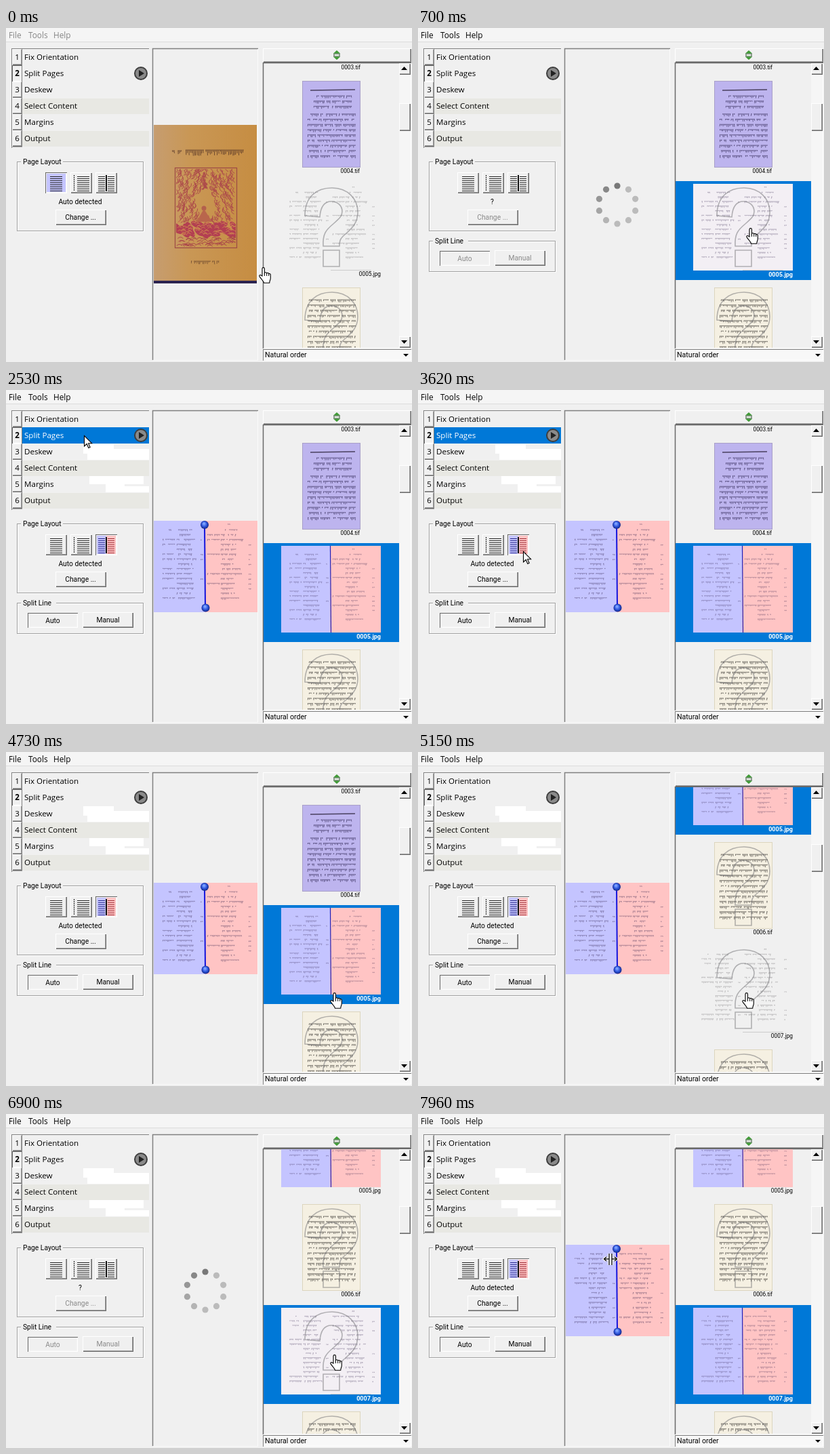
An HTML page with a canvas that plays this animation: 599x493 px, repeating every 8 s.

```html
<!DOCTYPE html>
<html lang="en">
<head>
<meta charset="utf-8">
<title>Splitting scanned pages</title>
<style>
html, body { margin: 0; width: 100%; height: 100%; overflow: hidden; background: #f0f0f0; }
canvas { display: block; }
</style>
</head>
<body>
<canvas id="stage" width="599" height="493"></canvas>
<script>
const c = document.getElementById('stage').getContext('2d');
const LOOP = 8000, BLUE = '#0078d7', LILAC = '#c4c4ff', PINK = '#ffc4c4';
const UI = '"Open Sans", "Noto Sans", sans-serif';
const SMALL = 'Roboto, "Open Sans", sans-serif';

// Pointer stops: time, left, top, shape
const pointer = [
  [0, 373, 353, 'hand'], [140, 410, 334, 'hand'], [280, 447, 314, 'hand'], [420, 484, 295, 'hand'],
  [1400, 335, 216, 'arrow'], [1540, 197, 143, 'arrow'], [1700, 175, 128, 'arrow'],
  [1850, 147, 110, 'arrow'], [1990, 123, 86, 'arrow'], [2130, 115, 67, 'arrow'],
  [3070, 118, 84, 'arrow'], [3200, 128, 126, 'arrow'], [3340, 140, 176, 'arrow'],
  [3480, 151, 220, 'arrow'], [3620, 155, 238, 'arrow'], [3780, 255, 252, 'arrow'],
  [3910, 400, 272, 'hand'], [4050, 496, 285, 'hand'], [4170, 495, 285, 'hand'],
  [4730, 478, 355, 'hand'], [7160, 455, 348, 'hand'], [7300, 421, 336, 'hand'],
  [7420, 372, 304, 'arrow'], [7560, 330, 262, 'split'], [7690, 303, 234, 'split'],
  [7830, 290, 220, 'split'], [7960, 284, 214, 'split']
];
const handShape = new Path2D('M5 13V2.3a1.7 1.7 0 0 1 3.4 0V8.5c.5-1 3-1 3.3.4.8-.8 2.8-.5 3 .8 1-.6 2.6 0 2.6 1.6V16c0 3-1.6 4-1.6 7.3H7.5C7 20.5 3 17 1 13.6c-.8-1.6 1.2-2.8 2.6-1.4z');
const arrowShape = new Path2D('M.5.5V16l3.7-3.5 2.6 6 2.3-1-2.5-5.8h5z');
const markShape = new Path2D('M-39 41C-39 13-22 0 1 0C25 0 39 17 39 36C39 52 30 60 21 68C14 74 12 76 12 86H-12C-13 68-8 62 3 53C11 46 16 42 16 35C16 26 9 20 0 20C-10 20-16 28-17 43ZM-12 92h24v24h-24z');

let seed = 1;
const rnd = () => (seed = seed * 16807 % 2147483647) / 2147483647;

function box(x, y, w, h, color) {
  c.fillStyle = color;
  c.fillRect(x, y, w, h);
}
function text(s, x, y, size, color = '#000', font = UI, align = 'left', weight = 400) {
  c.font = `${weight} ${size}px ${font}`;
  c.textAlign = align;
  c.textBaseline = 'middle';
  c.fillStyle = color;
  c.fillText(s, x, y);
}
function line(color, width, ...p) {
  c.strokeStyle = color;
  c.lineWidth = width;
  c.beginPath();
  for (let i = 0; i < p.length; i += 2) c.lineTo(p[i], p[i + 1]);
  c.stroke();
}
function disc(x, y, r, color) {
  c.fillStyle = color;
  c.beginPath();
  c.arc(x, y, r, 0, 7);
  c.fill();
}
function bevel(x, y, w, h, sunken) {
  box(x, y, w, h, sunken ? '#696969' : '#fff');
  box(x + 1, y + 1, w - 1, h - 1, sunken ? '#fff' : '#696969');
  box(x + 1, y + 1, w - 2, h - 2, sunken ? '#f4f4f4' : '#a0a0a0');
  box(x + 1, y + 1, w - 3, h - 3, '#f0f0f0');
}

// Adds a run of script-like strokes hanging from a head line
function scribble(x, y, w, h) {
  for (let i = x; i < x + w; i += 2.1) {
    if (rnd() < .12) continue;
    c.moveTo(i, y);
    c.lineTo(i + 1.5, y);
    c.moveTo(i + .6, y);
    c.lineTo(i + rnd() * 1.4, y + h * (.2 + .8 * rnd()));
  }
}
function ink(color, width, build) {
  c.strokeStyle = color;
  c.lineWidth = width;
  c.beginPath();
  build();
  c.stroke();
}

function spread(x, y, w, h, start, tinted, paper, inkColor) {
  c.save();
  c.translate(x, y);
  c.scale(w / 153, h / 135);
  if (tinted) {
    box(0, 0, 75, 135, LILAC);
    box(75, 0, 78, 135, PINK);
  } else if (paper) box(0, 0, 153, 135, paper);
  seed = start;
  ink(inkColor, .65, () => {
    scribble(20, 13, 5, 2);
    scribble(36, 13, 20, 3);
    scribble(109, 5, 4, 2);
    for (let i = 0; i < 14; i++) {
      const v = 20 + i * 7.2, title = i == (start == 77 ? 7 : 0);
      if (!title && rnd() < .55) scribble(13, v, 17, 2.5);
      scribble(title ? 38 : 34, v, title ? 16 : 20 + rnd() * 10, 3);
      if (!title && rnd() < .5) scribble(69, v + 1, 3, 1.5);
    }
    for (let i = 0; i < 15; i++) {
      const v = 13 + i * 7.2, title = i == (start == 77 ? 10 : 0);
      if (!title && rnd() < .55) scribble(79, v, 18, 2.5);
      scribble(title ? 105 : 99, v, title ? 20 : 18 + rnd() * 14, 3);
      if (!title && rnd() < .5) scribble(140, v + 1, 4, 1.5);
    }
  });
  if (!tinted) line('#c0c0c0', .8, 76, 134.5, 138, 134.5);
  c.restore();
}

function portrait(y, start, tinted) {
  box(437, y, 86, 128, tinted ? '#bdb4ee' : '#f5f0e2');
  c.strokeStyle = tinted ? '#a9a0c8' : '#dcd5be';
  c.lineWidth = 1;
  c.strokeRect(437.5, y + .5, 85, 127);
  seed = start;
  if (tinted) line('#49405f', 1.3, 449, y + 14, 515, y + 13);
  ink(tinted ? 'rgba(50,40,85,.85)' : 'rgba(50,46,42,.85)', .75, () => {
    for (let i = 0; i < 13; i++) {
      const v = y + 18 + i * 7.7, short = tinted && i < 3;
      if (short) scribble(454, v + 4, 55, 4);
      else if (!tinted || i > 3) scribble(445, v, 70, 4);
    }
  });
}

function mark(x, y) {
  c.save();
  c.translate(x, y);
  c.strokeStyle = 'rgba(110,110,115,.5)';
  c.lineWidth = 1.6;
  c.stroke(markShape);
  c.restore();
}

function cover() {
  const g = c.createLinearGradient(218, 0, 370, 0);
  g.addColorStop(0, '#c69d70');
  g.addColorStop(.35, '#c99755');
  g.addColorStop(1, '#c68d42');
  c.fillStyle = g;
  c.fillRect(218, 143, 152, 234);
  box(218, 373, 152, 4, '#2b2350');
  seed = 9;
  ink('rgba(80,48,36,.85)', .9, () => { scribble(243, 181, 15, 7); scribble(265, 180, 86, 9); });
  ink('rgba(90,58,38,.8)', .8, () => scribble(273, 344, 42, 5));
  c.strokeStyle = '#9d4a46';
  c.lineWidth = 1.2;
  c.strokeRect(249.5, 206.5, 91, 118);
  c.save();
  c.beginPath();
  c.rect(251, 208, 88, 115);
  c.clip();
  ink('#ad4a4b', 1, () => {
    for (let i = 0; i < 420; i++) {
      const x = 250 + rnd() * 88, y = 210 + rnd() * 78;
      if (Math.hypot((x - 294) / 15, (y - 262) / 24) < 1) continue;
      const lean = x < 294 ? 5 : -5;
      c.moveTo(x, y);
      c.quadraticCurveTo(x + lean, y - 2, x + lean * rnd(), y - 7);
    }
  });
  c.fillStyle = '#b33f52';
  for (let i = 0; i < 34; i++) {
    c.beginPath();
    c.ellipse(252 + rnd() * 86, 289 + rnd() * 16, 8, 4, rnd(), 0, 7);
    c.fill();
  }
  ink('#cf8950', .9, () => {
    for (let i = 0; i < 90; i++) {
      const x = 252 + rnd() * 84, y = 286 + rnd() * 20;
      c.moveTo(x, y);
      c.quadraticCurveTo(x + 3, y - 4, x + 6, y);
    }
  });
  ink('#a9434a', 1, () => {
    for (let i = 0; i < 55; i++) {
      const x = 250 + rnd() * 84, y = 309 + rnd() * 14;
      c.moveTo(x, y);
      c.quadraticCurveTo(x + 4, y - 4, x + 8, y);
    }
  });
  disc(292, 266, 3.5, '#b3604c');
  c.fillStyle = '#b9664c';
  c.beginPath();
  c.moveTo(292, 267);
  c.lineTo(304, 286);
  c.lineTo(281, 286);
  c.fill();
  c.restore();
}

function knob(x, y) {
  const g = c.createRadialGradient(x - 1, y - 2, 1, x, y, 6.5);
  g.addColorStop(0, '#7fa4ff');
  g.addColorStop(.5, '#2e55dc');
  g.addColorStop(1, '#0c1f78');
  disc(x, y, 6, g);
}

function spinner(head) {
  for (let i = 0; i < 10; i++) {
    const a = i * Math.PI / 5, age = ((head - i) % 10 + 10) % 10;
    const v = Math.min(187, 120 + age * 15);
    disc(294 + 28 * Math.sin(a), 261 - 28 * Math.cos(a), 4.6, `rgb(${v},${v},${v})`);
  }
}

function steps(t) {
  box(8, 30, 203, 147, '#808080');
  box(9, 31, 202, 146, '#f0f0f0');
  const patches = t >= 1990;
  ['Fix Orientation', 'Split Pages', 'Deskew', 'Select Content', 'Margins', 'Output'].forEach((name, i) => {
    const y = 32 + i * 24, on = i == 1, hot = on && t >= 2400 && t < 3780;
    if (i == 3 || i == 5) box(24, y, 187, 23, '#e8e8e3');
    if (hot) box(24, y - 1, 187, 24, BLUE);
    if (patches && i == 2) {
      box(114, 80, 45, 14, '#fff');
      box(120, 87, 91, 16, '#fff');
    }
    if (patches && i == 4) {
      box(123, 127, 80, 12, '#fff');
      box(147, 139, 28, 12, '#fff');
      box(175, 142, 36, 9, '#fff');
    }
    bevel(9, y - 1, 15, 24, on);
    text(i + 1, 16.5, y + 12, 11.5, '#000', UI, 'center', on ? 700 : 400);
    text(name, 27, y + 12.4, 11.6, hot ? '#fff' : '#000');
  });
  line('#808080', 1, 23.5, 31, 23.5, 176);
  line('#a0a0a0', 1, 8, 175.5, 24, 175.5);
  disc(199, 67, 10, '#3d3d3d');
  disc(199, 67, 8, '#8a8a8a');
  c.fillStyle = '#222';
  c.beginPath();
  c.moveTo(196, 62);
  c.lineTo(204, 67);
  c.lineTo(196, 72);
  c.fill();
}

function group(title, y, h, w) {
  c.lineWidth = 1;
  c.strokeStyle = '#fff';
  c.strokeRect(17.5, y + 1.5, 186, h);
  c.strokeStyle = '#a0a0a0';
  c.strokeRect(16.5, y + .5, 186, h);
  box(22, y - 4, w, 10, '#f0f0f0');
  text(title, 25, y + 1, 10.3, '#000', SMALL);
}

function layoutIcon(n, on) {
  const x = 58 + n * 37;
  bevel(x, 213, 32, 31, on);
  if (on) {
    box(x + 2, 215, n ? 14 : 28, 27, LILAC);
    if (n) box(x + 16, 215, 14, 27, PINK);
  }
  for (let y = 219; y < 241; y += 3) {
    if (n == 2) {
      box(x + 4, y, 10, 1, on ? '#28288c' : '#222');
      box(x + 18, y, 10, 1, on ? '#a03038' : '#222');
    } else box(x + (n ? 10 : 7), y, 18, 1, '#222');
  }
  if (n == 2) box(x + 15, 217, 2, 24, '#111');
  if (n == 1) for (let y = 217; y < 241; y += 3) box(x + 5, y, 1, 2, '#111');
}

function panel(mode) {
  const busy = mode == 'busy', tone = busy ? '#8a8a8a' : '#000';
  group('Page Layout', 197, 102, 62);
  const chosen = { cover: 0, busy: -1, done: 2 }[mode];
  for (let n = 0; n < 3; n++) layoutIcon(n, n == chosen);
  text(busy ? '?' : 'Auto detected', 109.5, 257, 10.3, '#000', SMALL, 'center');
  bevel(73, 268, 75, 23);
  text('Change ...', 110, 280, 10.3, tone, SMALL, 'center');
  if (mode == 'cover') return;
  group('Split Line', 314, 45, 52);
  bevel(32, 329, 74, 22, true);
  bevel(113, 328, 75, 23);
  text('Auto', 69, 341, 10.3, tone, SMALL, 'center');
  text('Manual', 150.5, 340, 10.3, tone, SMALL, 'center');
}

function view(mode, t, page) {
  line('#808080', 1.5, 216.5, 490, 216.5, 30.5, 372, 30.5);
  line('#fafafa', 1, 371.5, 31, 371.5, 490.5, 217, 490.5);
  if (mode == 'cover') cover();
  else if (mode == 'busy') spinner(t < 2000 ? Math.floor((t - 700) / 145) : 8 + Math.floor((t - 6595) / 145));
  else {
    spread(218, 193, 153, 135, page, true, null, 'rgba(50,35,75,.6)');
    line('#1414dc', 2, 293, 199, 294, 321);
    knob(293, 199);
    knob(294.5, 321.5);
  }
}

function label(s, right, y, selected) {
  text(s, right, y, selected ? 9 : 8.3, selected ? '#fff' : '#000', SMALL, 'right', selected ? 700 : 400);
}

function spreadThumb(y, start, name, selected, done) {
  if (selected) box(380, y - 4, 200, 146, BLUE);
  spread(406, y, 147, 128, start, done, selected ? '#f3eff4' : null,
    done || selected ? 'rgba(50,35,75,.5)' : 'rgba(95,90,95,.5)');
  if (done) line('#2020b8', 1.2, 478.5, y, 479.5, y + 128);
  else mark(480, y + 6);
  label(name, 553, y + 134, selected);
}

function arrowHead(x, y, dir) {
  c.fillStyle = '#000';
  c.beginPath();
  c.moveTo(x - 4.5, y + 2 * -dir);
  c.lineTo(x + 4.5, y + 2 * -dir);
  c.lineTo(x, y + 3 * dir);
  c.fill();
}

function list(t) {
  bevel(379, 30, 219, 21);
  box(483, 37, 10, 6, '#8b9a8b');
  c.fillStyle = '#3f9a35';
  for (const d of [-1, 1]) {
    c.beginPath();
    c.moveTo(483, 40 + 2.5 * d);
    c.lineTo(493, 40 + 2.5 * d);
    c.lineTo(488, 40 + 7 * d);
    c.fill();
  }
  box(485, 39, 6, 2, '#e8f0e6');
  line('#696969', 1.5, 379.5, 473, 379.5, 51.5, 598, 51.5);
  line('#fff', 1, 380, 472.5, 597.5, 472.5, 597.5, 52);

  const scroll = t < 5000 ? 0 : t < 5150 ? 125 : 250;
  c.save();
  c.beginPath();
  c.rect(380, 52, 200, 420);
  c.clip();
  c.translate(0, -scroll);
  label('0003.tif', 523, 59);
  portrait(78, 31, true);
  label('0004.tif', 522, 212);
  spreadThumb(230, 41, '0005.jpg', t >= 700 && t < 5870, t >= 1270);
  portrait(383, 53);
  mark(480, 390);
  label('0006.tif', 523, 517);
  spreadThumb(536, 77, '0007.jpg', t >= 5870, t >= 7020);
  portrait(689, 91);
  mark(480, 696);
  c.restore();

  box(580, 52, 17, 420, '#f6f6f6');
  bevel(580, 52, 17, 17);
  bevel(580, 111 + scroll / 10, 17, 41);
  bevel(580, 455, 17, 17);
  arrowHead(587.5, 60, -1);
  arrowHead(587.5, 463, 1);

  box(379, 474, 219, 17, '#808080');
  box(380, 475, 218, 16, '#fff');
  box(380, 475, 217, 15, '#f8f8f8');
  text('Natural order', 382, 483, 10.6, '#000', SMALL);
  c.fillStyle = '#000';
  c.beginPath();
  c.moveTo(586, 481);
  c.lineTo(594, 481);
  c.lineTo(590, 485);
  c.fill();
}

function drawPointer(t) {
  const [, x, y, shape] = pointer.findLast(p => p[0] <= t);
  c.save();
  c.translate(x, y);
  c.fillStyle = '#fff';
  c.strokeStyle = '#000';
  c.lineWidth = 1.1;
  if (shape == 'split') {
    for (const [color, w] of [['#fff', 3.5], ['#000', 1.3]]) {
      for (const d of [-1, 1]) {
        line(color, w, 2 * d, -8, 2 * d, 9);
        line(color, w, 2 * d, 0, 9 * d, 0);
        line(color, w, 6 * d, -3, 9.5 * d, 0, 6 * d, 3);
      }
    }
  } else {
    const path = shape == 'hand' ? handShape : arrowShape;
    c.fill(path);
    c.stroke(path);
    if (shape == 'hand') for (const fx of [8.4, 11.7, 14.7]) line('#000', 1, fx, 9, fx, 13);
  }
  c.restore();
}

function draw(t) {
  const mode = t < 700 ? 'cover' : t < 1270 || t >= 5870 && t < 7020 ? 'busy' : 'done';
  box(0, 0, 599, 493, '#f0f0f0');
  box(0, 0, 599, 20, '#f5f5f5');
  box(0, 20, 599, 1, '#dcdcdc');
  [['File', 4], ['Tools', 33], ['Help', 70]].forEach(([s, x]) =>
    text(s, x, 11.5, 11.8, t < 700 ? '#858585' : '#000'));
  steps(t);
  panel(mode);
  view(mode, t, t < 5870 ? 41 : 77);
  list(t);
  drawPointer(t);
}

const begin = performance.now();
function tick() {
  draw((performance.now() - begin) % LOOP);
  requestAnimationFrame(tick);
}
tick();
</script>
</body>
</html>
```
